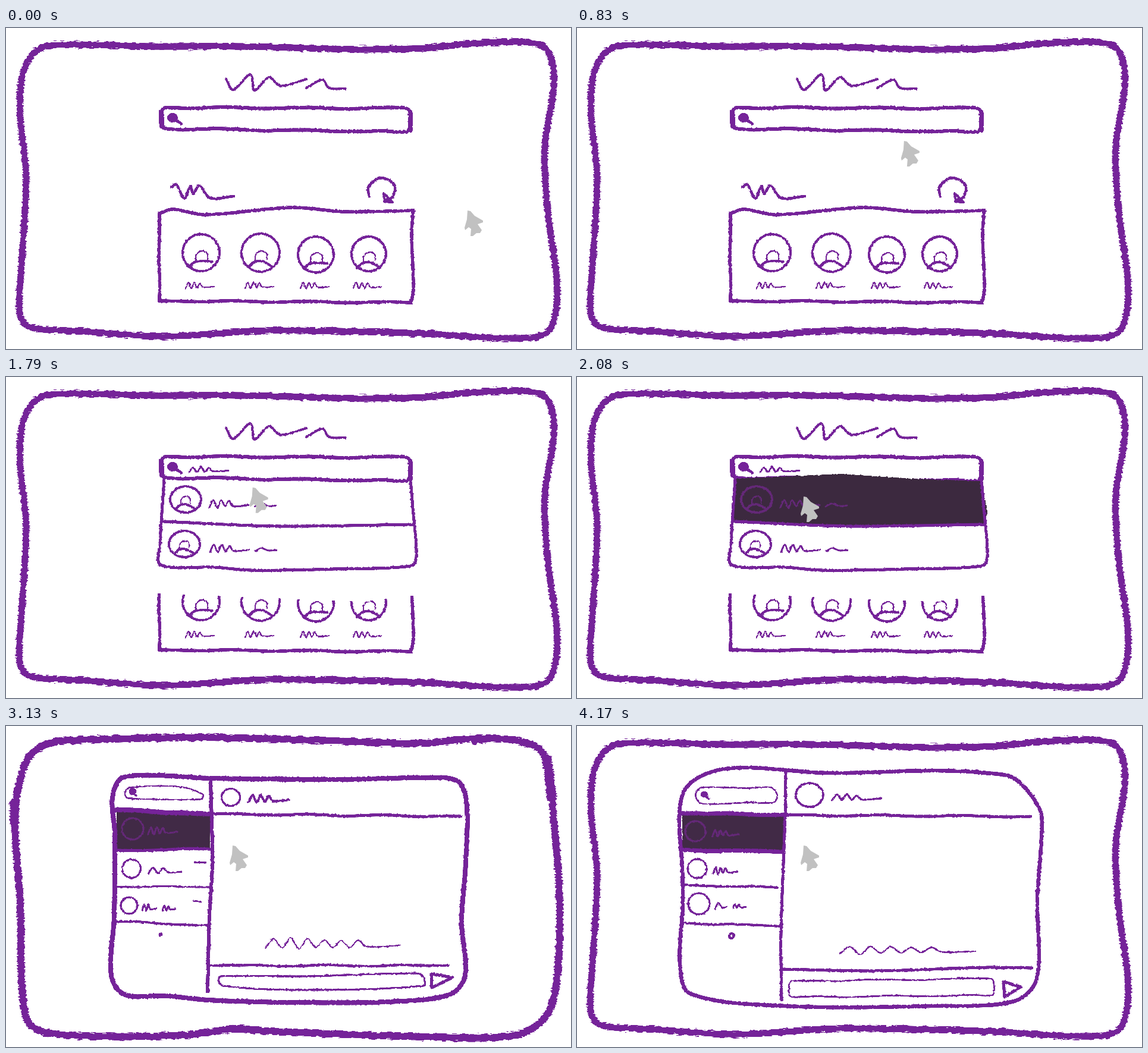
These frames come from a looping animation (950x540 px, 4.21 s). An HTML page:

```html
<!DOCTYPE html>
<html lang="en">
<head>
<meta charset="utf-8">
<title>Search sketch</title>
<style>
html, body { margin: 0; width: 100%; height: 100%; overflow: hidden; background: #fff; }
svg { display: block; width: 100vw; height: 100vh; }
.ink { fill: none; stroke: #752399; stroke-linecap: round; stroke-linejoin: round; }
.dim .ink { stroke: #642878; }
.blob { fill: #752399; }
</style>
</head>
<body>
<svg viewBox="0 0 950 540">
  <defs>
    <clipPath id="low0"><path d="M240 363L300 366L600 378L700 366V480H240Z"/></clipPath>
    <clipPath id="low1"><path d="M230 372H700V480H230Z"/></clipPath>
  </defs>
  <g id="stage"></g>
  <path id="cursor" fill="#c1c1c1" d="M776 307L781 308L788 316L802 324V327L793 330L800 340L797 345H791L785 350H781L782 338L778 335L772 340L771 336L775 322Z"/>
</svg>
<script>
const stage = document.getElementById('stage');
const cursor = document.getElementById('cursor');

const parse = text => text.split(' ').map(s => s.split(',').map(Number));
const dist = (a, b) => Math.hypot(b[0] - a[0], b[1] - a[1]) || 1;
const mix = (a, b, f) => a.map((v, k) => v + (b[k] - v) * f);

// Smooth path; tangents follow chord length, so uneven spacing does not overshoot
function curve(p, closed) {
  const n = p.length;
  const get = i => closed ? p[(i + n) % n] : p[Math.min(n - 1, Math.max(0, i))];
  const slope = i => {
    const a = get(i - 1), b = get(i), c = get(i + 1), len = dist(a, b) + dist(b, c);
    return [(c[0] - a[0]) / len, (c[1] - a[1]) / len];
  };
  let d = 'M' + p[0];
  for (let i = 0; i < n - !closed; i++) {
    const b = get(i), c = get(i + 1), m = slope(i), k = slope(i + 1), t = dist(b, c) / 3;
    d += `C${b.map((v, j) => v + m[j] * t)} ${c.map((v, j) => v - k[j] * t)} ${c}`;
  }
  return d;
}

const ink = (w, d) => `<path class="ink" stroke-width="${w}" d="${d}"/>`;
const line = (w, text) => ink(w, curve(parse(text)));
const loop = (w, text) => ink(w, curve(parse(text), true));
const poly = (w, text) => ink(w, `M${text}Z`);
const shade = (color, text) => `<path fill="${color}" d="M${text}Z"/>`;
const oval = (w, x, y, rx, ry = rx) =>
  `<ellipse class="ink" stroke-width="${w}" cx="${x}" cy="${y}" rx="${rx}" ry="${ry}"/>`;
const lens = (x, y, r, hx, hy) =>
  `<ellipse class="blob" cx="${x}" cy="${y}" rx="${r}" ry="${r * .9}"/>` + line(r / 2, `${x},${y} ${hx},${hy}`);

// Hand-drawn straight stroke: points along it drift sideways
function shaky(a, b) {
  const len = dist(a, b), n = Math.max(1, Math.round(len / 40));
  return Array.from({ length: n + 1 }, (_, i) => {
    const off = i % n ? 1.2 * Math.sin(i * 1.9 + a[0] + a[1]) : 0;
    const [x, y] = mix(a, b, i / n);
    return [x - (b[1] - a[1]) / len * off, y + (b[0] - a[0]) / len * off];
  });
}
const edge = (w, x1, y1, x2, y2) => ink(w, curve(shaky([x1, y1], [x2, y2])));

// Four-cornered outline with rounded corners
function box(w, text, r) {
  const c = parse(text);
  return ink(w, curve(c.flatMap((a, i) => {
    const b = c[(i + 1) % c.length], f = r / dist(a, b);
    return shaky(mix(a, b, f), mix(b, a, f));
  }), true));
}

function random(seed) {
  return () => (seed = (seed * 16807 + 11) % 2147483647) / 2147483647;
}

// Fake handwriting: n fading peaks, then a flat tail taking the given share of the width
function scrawl(w, x, y, width, height, n, tail = .4) {
  const rnd = random(x * 31 + y), pts = [[x, y + height * .4]];
  for (let k = 1; k <= 2 * n; k++) {
    const f = k / (2 * n), amp = height / 2 * (1 - .5 * f) * (.8 + .4 * rnd());
    pts.push([x + width * (1 - tail) * f, y + (k % 2 ? -amp : amp)]);
  }
  pts.push([x + width, y + height * .15]);
  return ink(w, curve(pts));
}

function bust(w, x, y, s, end) {
  const at = list => list.map(([a, b]) => [x + a * s, y + b * s]);
  return ink(w * .55, curve(at([[-10, 14], [-9, 3], [0, -3], [9, 1], [10, 11]]))) +
    ink(w, curve(at([[-21, 24], [-12, 16], [1, 14], [18, end]])));
}
const person = (x, y, r, i) => oval(4, x, y, r) + bust(4.2, x + 1, y, 1, i % 2 ? 23 : 15) +
  scrawl(2.4, x - 26, 433, 48, 13, 3);
const row = (x, y, tx) => oval(4, x, y, 26, 22) + bust(4, x, y - 3, .8, 22) +
  scrawl(3, tx, y + 7, 66, 16, 3) + scrawl(2.8, tx + 76, y + 9, 36, 7, 1);
const contact = (x, y, r, tx, width, n) => oval(3.2, x, y, r) + scrawl(3, tx, y + 3, width, 14, n);

const HOVER = '#3c293f', ACTIVE = '#412a46';

const poses = [{
  frame: loop(11, '75,29 250,31 400,31 600,36 700,34 800,25 885,25 912,40 921,95 906,200 911,310 927,440 912,510 860,522 700,514 440,509 260,519 130,510 40,503 23,480 26,400 34,250 24,150 27,82 45,44'),
  top: line(4, '370,86 382,104 411,78 418,105 442,83 460,97 480,94 505,86') +
    line(4, '505,101 532,87 543,101 571,102') +
    box(6, '261,134 680,135 680,175 261,169', 7) +
    edge(8, 261, 140, 262, 165) + edge(8, 680, 142, 680, 172) + lens(280, 151, 9, 295, 161),
  label: line(4.5, '278,268 286,263 300,287 310,266 315,279 325,265 343,286 383,283') +
    line(4.5, '611,283 609,268 630,252 653,264 650,284 638,290') + poly(4, '635 278L636 292L650 293'),
  card: line(5.5, '258,312 280,305 335,314 480,302 570,309 685,307') +
    line(5.5, '685,307 682,345 685,440 681,462') + edge(5.5, 681, 462, 258, 459) + edge(5.5, 258, 459, 258, 312) +
    [[328, 378, 31], [428, 378, 32], [521, 381, 30], [610, 380, 29]].map((p, i) => person(...p, i)).join(''),
  list: scrawl(3, 308, 156, 66, 10, 3) +
    line(5, '266,172 259,280 260,316 350,320 410,325 550,323 680,318 690,303 684,220 680,172') +
    line(5, '266,243 390,249 480,251 685,248') + row(300, 281, 343),
  first: row(302, 206, 342),
  hover: shade(HOVER, '267 171L445 163L560 171L680 175L690 225L686 249L480 253L390 250L262 243'),
  chat: shade(ACTIVE, '177 150L348 151L345 209L177 207') +
    loop(6.5, '172,146 185,102 230,76 290,70 420,79 600,75 700,80 738,90 778,140 781,185 774,290 773,425 735,463 600,471 350,471 190,450 173,400 178,300 177,240') +
    edge(7, 175, 147, 350, 149) + edge(7, 175, 208, 347, 212) +
    line(5, '351,77 350,150 343,350 344,461') + edge(5, 350, 150, 763, 152) + line(5, '345,409 500,412 690,406 765,407') +
    edge(4, 178, 267, 337, 272) + edge(4, 178, 331, 343, 337) +
    box(2.6, '200,104 333,103 338,129 201,130', 8) + lens(214, 115, 6, 222, 123) +
    box(2.6, '357,429 700,425 701,453 357,456', 4) + poly(5, '717 430L746 439L719 456') +
    `<g class="dim">${contact(199, 177, 17, 228, 44, 3)}</g>` +
    contact(202, 240, 16, 229, 41, 3) + contact(205, 299, 18, 232, 20, 1) + scrawl(3, 262, 303, 22, 8, 2) +
    oval(3.5, 391, 116, 23, 20) + scrawl(3.5, 429, 120, 82, 12, 3) + oval(4, 260, 353, 4) +
    scrawl(2.5, 442, 377, 228, 14, 5, .25)
}, {
  frame: loop(12, '75,28 110,24 320,19 520,24 700,29 810,20 890,34 911,65 921,160 930,270 928,410 910,485 860,519 720,523 430,513 390,509 300,520 130,521 45,507 28,455 24,300 15,150 28,75 45,45') +
    edge(16, 909, 55, 917, 120) + edge(15, 14, 130, 14, 162) + edge(14, 788, 24, 812, 21),
  top: line(5, '356,97 362,105 380,96 392,78 403,108 425,70 434,114 456,80 466,102 478,90 490,104 505,92 522,97 524,105 578,104') +
    line(5.5, '272,178 267,162 274,146 290,142 440,144 640,140 675,147 690,165 686,178 510,181 430,178 272,178') +
    edge(8, 269, 154, 270, 175) + edge(8, 688, 160, 687, 176) + lens(287, 160, 9, 298, 174),
  label: line(4.5, '268,270 278,265 290,284 300,264 306,280 314,266 332,284 376,283') +
    line(4.5, '602,283 600,268 622,252 645,264 641,284 630,290') + poly(4, '626 278L627 292L641 293'),
  card: line(5.5, '246,372 248,309 370,310 450,305 679,308 680,372') +
    line(5.5, '680,372 679,400 673,430 671,459') + edge(5.5, 671, 460, 246, 461) + edge(5.5, 246, 461, 246, 372) +
    [[314, 379, 31], [412, 377, 32], [509, 374, 31], [602, 380, 29]].map((p, i) => person(...p, i)).join(''),
  list: scrawl(3, 309, 162, 65, 10, 3) +
    line(5, '266,178 266,260 263,314 330,330 470,337 620,331 697,318 698,280 692,170') +
    edge(5, 268, 254, 697, 255) + row(307, 292, 348),
  first: row(305, 219, 345),
  hover: shade(HOVER, '268 181L691 181L695 254L268 254'),
  chat: shade(ACTIVE, '186 143L343 148L343 208L186 208') +
    loop(8, '179,120 198,86 345,88 560,90 700,87 758,92 774,125 773,230 766,330 772,420 745,452 640,464 480,465 340,461 270,454 200,452 177,420 182,320 183,180') +
    edge(8, 183, 141, 345, 148) + line(6, '344,90 347,230 342,320 339,446') +
    edge(5, 345, 148, 765, 152) + edge(5, 186, 209, 344, 207) +
    edge(3, 183, 270, 343, 271) + edge(4, 183, 329, 341, 335) + edge(4.5, 340, 403, 744, 403) +
    edge(3, 317, 229, 336, 230) + edge(3, 315, 294, 328, 296) +
    loop(2.4, '200,113 206,104 290,102 331,115 328,123 240,123 204,121') + lens(213, 110, 6.5, 219, 117) +
    loop(3.2, '357,428 362,421 500,421 690,416 702,422 702,437 480,444 365,437') + poly(5, '715 417L751 423L716 440') +
    `<g class="dim">${contact(213, 173, 18, 239, 49, 3)}</g>` +
    contact(211, 240, 15.5, 239, 56, 2) + contact(207, 302, 14, 229, 23, 2) + scrawl(3, 263, 306, 22, 11, 2) +
    oval(3.2, 378, 120, 15.5, 14.5) + scrawl(4, 408, 122, 68, 15, 3) + oval(4, 260, 351, 1.5) +
    scrawl(2.2, 436, 366, 227, 20, 6, .25)
}];

// Chalky edges: displaced by noise, then hardened
const rough = (id, freq, scale, seed) => `
  <filter id="${id}" filterUnits="userSpaceOnUse" x="0" y="0" width="950" height="540" color-interpolation-filters="sRGB">
    <feTurbulence type="fractalNoise" baseFrequency="${freq}" numOctaves="2" seed="${seed}" result="n"/>
    <feDisplacementMap in="SourceGraphic" in2="n" scale="${scale}" xChannelSelector="R" yChannelSelector="G"/>
    <feComponentTransfer><feFuncA type="linear" slope="5" intercept="-1.8"/></feComponentTransfer>
  </filter>`;
const layer = (key, filter, body) => `<g data-on="${key}" filter="url(#${filter})" display="none">${body}</g>`;

stage.innerHTML = poses.map((p, i) => {
  const thin = 'thin' + i, base = p.top + `<g clip-path="url(#low${i})">${p.card}</g>`;
  return rough('thick' + i, '.1 .4', 7, 3 + i) + rough(thin, '.25', 3.2, 8 + i) +
    layer(i + 'all', 'thick' + i, p.frame) +
    layer(i + 'home', thin, p.top + p.label + p.card) +
    layer(i + 'list', thin, base + p.list + p.first) +
    layer(i + 'hover', thin, base + p.hover + p.list + `<g class="dim">${p.first}</g>`) +
    layer(i + 'chat', thin, p.chat);
}).join('');
const layers = [...stage.querySelectorAll('[data-on]')];

const LOOP = 4210, STEP = 1000 / 24;
const part = (v, a, b) => Math.min(1, Math.max(0, (v - a) / (b - a)));
let shown = '';

function draw(ms) {
  const n = Math.min(100, Math.floor((ms % LOOP + 4) / STEP));
  const pose = Math.floor(n / 5) % 2;
  const scene = n < 32 ? 'home' : n < 46 ? 'list' : n < 60 ? 'hover' : 'chat';
  if (shown !== pose + scene) {
    shown = pose + scene;
    for (const g of layers) {
      const on = g.dataset.on === shown || g.dataset.on === pose + 'all';
      g.setAttribute('display', on ? 'inline' : 'none');
    }
  }
  const a = part(n, 0, 26), b = part(n, 37, 46);
  cursor.setAttribute('transform', `translate(${-294 * a - 101 * b} ${-152 * a + 46 * b})`);
}

const start = performance.now();
function tick() {
  draw(performance.now() - start);
  requestAnimationFrame(tick);
}
tick();
</script>
</body>
</html>
```
